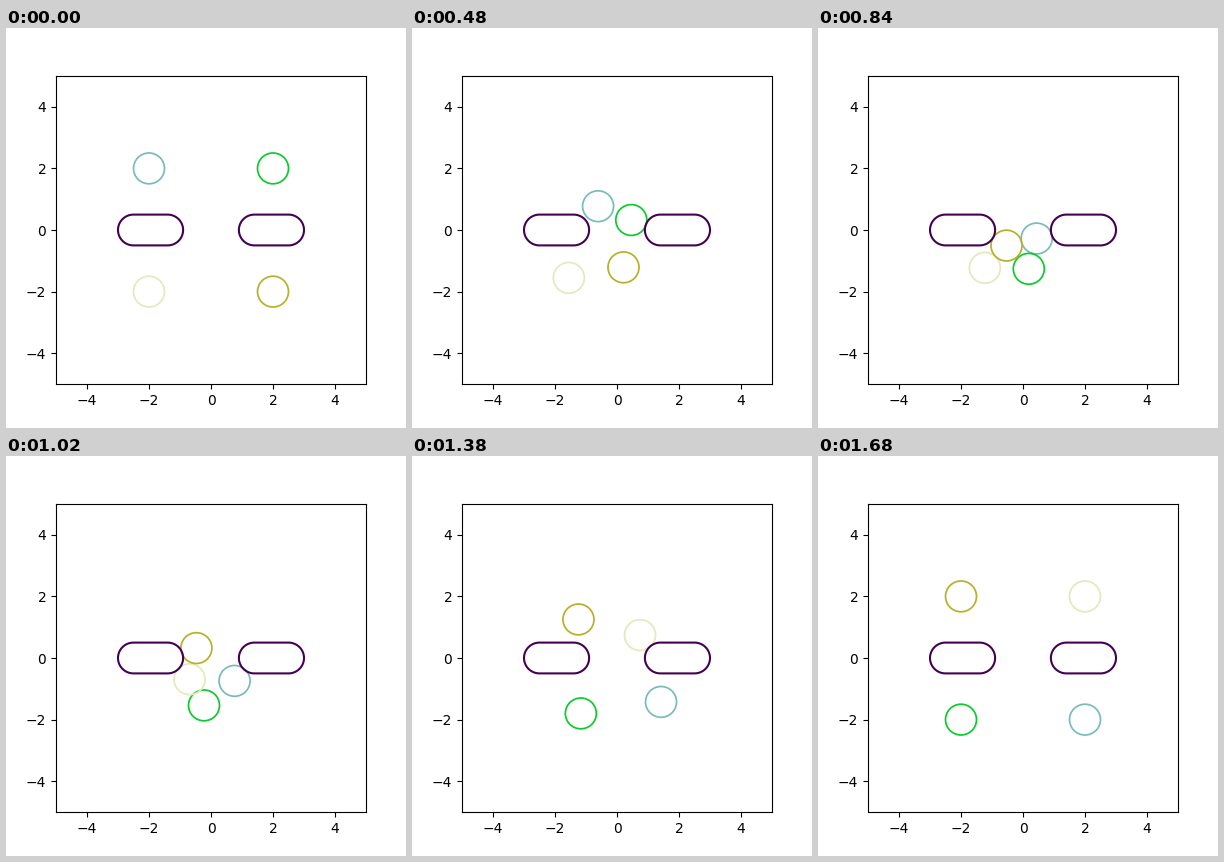
Recreate the animation shown at these times as a matplotlib script. Size 400 by 400 pixels, loop 1.71 s.

```python
import numpy as np
import matplotlib.pyplot as plt
from matplotlib.animation import FuncAnimation
from matplotlib.patches import Circle, Polygon

FRAMES = 57
INTERVAL = 30
STEPS = 38
RADIUS = 0.5


class Robot:
    """Disc crossing to the opposite corner at constant speed between turns."""

    def __init__(self, ax, color, start, *turns):
        x, y = start
        self.path = np.array([(0, x, y), *turns, (STEPS, -x, -y)]).T
        self.disc = ax.add_patch(
            Circle(start, RADIUS, fill=False, ec=color, lw=1.25))

    def move(self, step):
        t, x, y = self.path
        self.disc.center = np.interp(step, t, x), np.interp(step, t, y)


def add_capsule(ax, x0, x1):
    a = np.linspace(-np.pi / 2, np.pi / 2, 60)
    cap = RADIUS * np.column_stack([np.cos(a), np.sin(a)])
    outline = np.vstack([cap + (x1, 0), -cap + (x0, 0)])
    ax.add_patch(Polygon(outline, fill=False, ec="#440154", lw=1.5, zorder=2))


fig, ax = plt.subplots(figsize=(4, 4), dpi=100)
ax.set_xlim(-5, 5)
ax.set_ylim(-5, 5)

add_capsule(ax, -2.5, -1.4)
add_capsule(ax, 1.4, 2.5)

# Each turn is (step, x, y)
early, middle, late = STEPS * np.array([3, 4, 5]) / 8
robots = [
    Robot(ax, "#78bdb7", (-2, 2),
          (early, -0.2, 0.41), (middle, 0.44, -0.276), (late, 0.82, -0.83)),
    Robot(ax, "#0ccb2d", (2, 2),
          (10, 0.495, 0.523), (middle, 0.187, -1.26), (late, -0.303, -1.591)),
    Robot(ax, "#e6e8bd", (-2, -2),
          (20.3, -1.177, -1.175)),
    Robot(ax, "#b9b02a", (2, -2),
          (early, -0.32, -0.98), (middle, -0.532, -0.506), (late, -0.46, 0.477)),
]


def update(i):
    step = i - i // 3  # every third tick holds the pose
    for robot in robots:
        robot.move(step)
    return [robot.disc for robot in robots]


anim = FuncAnimation(fig, update, frames=FRAMES, interval=INTERVAL,
                     repeat=True, repeat_delay=0)
plt.show()
```
